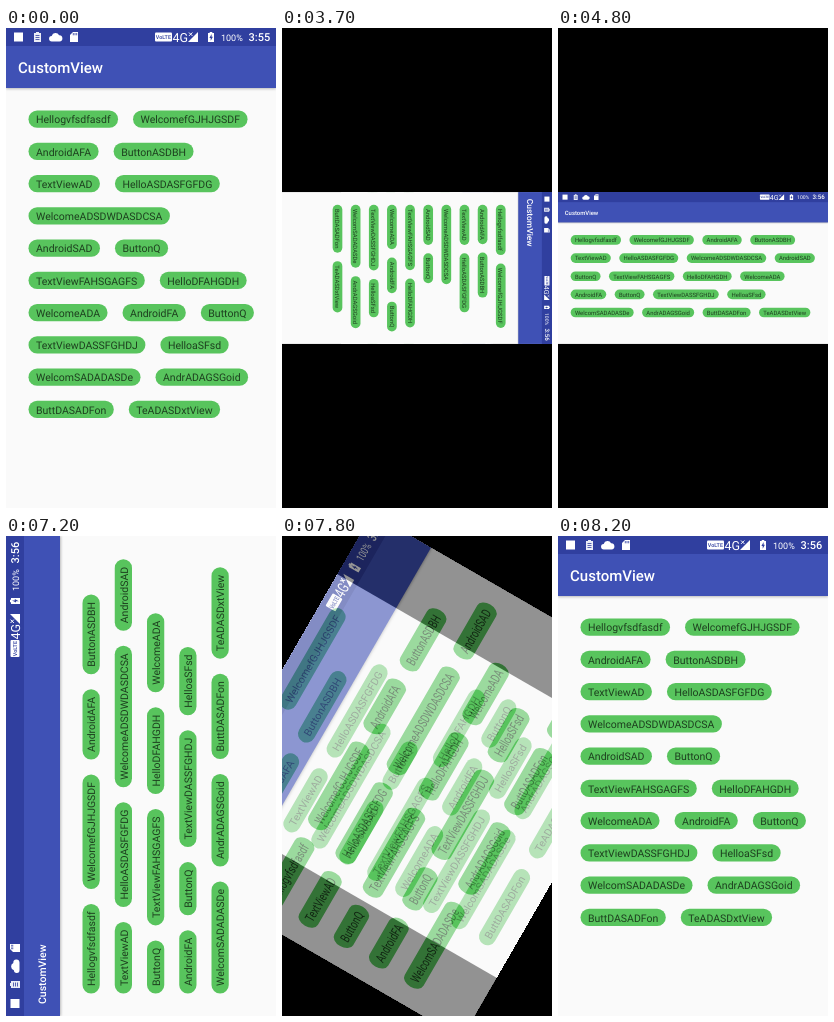
These frames come from a looping animation (270 px wide and 480 px high, 8.3 s). An HTML page:

```html
<!DOCTYPE html>
<html lang="en">
<head>
<meta charset="utf-8">
<title>CustomView</title>
<style>
html, body { margin: 0; width: 100%; height: 100%; overflow: hidden; background: #000; }
#stage { position: relative; width: 270px; height: 480px; overflow: hidden; background: #000; }
#view { position: absolute; left: 135px; top: 240px; overflow: hidden; background: #000; }
.screen, #frame { position: absolute; left: 50%; top: 50%; }
.screen { overflow: hidden; background: #fafafa; }
.screen svg { position: absolute; left: 0; top: 0; fill: #fff;
  font-family: Roboto, "Noto Sans", sans-serif; text-rendering: geometricPrecision; }
.bar { border-top: 18px solid #303f9f; background: #3f51b5; box-shadow: 0 .75px 2.5px rgba(0, 0, 0, .26); }
.medium { font-weight: 500; }
.chip rect { fill: #58c45d; }
.chip text { fill: rgba(0, 0, 0, .68); font-size: 10.5px; }
#frame { box-shadow: 0 0 0 600px #000; }
</style>
</head>
<body>
<div id="stage"><div id="view"></div></div>
<script>
const labels = ('Hellogvfsdfasdf WelcomefGJHJGSDF AndroidAFA ButtonASDBH TextViewAD HelloASDASFGFDG ' +
  'WelcomeADSDWDASDCSA AndroidSAD ButtonQ TextViewFAHSGAGFS HelloDFAHGDH WelcomeADA AndroidFA ' +
  'ButtonQ TextViewDASSFGHDJ HelloaSFsd WelcomSADADASDe AndrADAGSGoid ButtDASADFon TeADASDxtView').split(' ');

const statusIcons = width => `
  <rect x="8" y="4.5" width="9" height="9"/>
  <path d="M28 5h2v-1h3v1h2v9h-7z" opacity=".9"/>
  <path d="M29.5 7.5h4M29.5 9.5h4M29.5 11.5h4" stroke="#303f9f" stroke-width=".8"/>
  <path d="M46 13.5a2.8 2.8 0 0 1-.3-5.6a4 4 0 0 1 7.4-.6a3.1 3.1 0 0 1 .4 6.2z"/>
  <path d="M67 4h5v10h-8v-7z"/>
  <path d="M67.3 5v2.3M69 5v2.3M70.7 5v2.3" stroke="#303f9f" stroke-width=".8"/>
  <g transform="translate(${width - 270})">
    <rect x="149" y="4.5" width="17" height="9" rx="1"/>
    <text class="medium" x="149.8" y="11.2" font-size="5.4" fill="#303f9f">VoLTE</text>
    <text x="166.5" y="13.8" font-size="12.5">4G</text>
    <path d="M182 14L192 4V14z"/>
    <path d="M183 4.5l3.4 3.4m0-3.4l-3.4 3.4" stroke="#fff"/>
    <path d="M202 5h1.7v-1h2.6v1h1.7v9h-6z"/>
    <path d="M205.6 6l-2.2 4h1.3v2.8l2.2-4h-1.3z" fill="#303f9f"/>
    <text x="215" y="12.6" font-size="9">100%</text>
    <text class="clock medium" x="242.5" y="13" font-size="11">3:55</text>
  </g>`;

const view = document.getElementById('view');
const EDGE = 22.5, GAP = 15, PAD = 7.5, CHIP = 17.25, ROW = CHIP + GAP;

// lay the chips out row by row, each as wide as its text
function flow(svg, top, counts) {
  const chips = svg.querySelectorAll('.chip');
  let next = 0;
  counts.forEach((n, row) => {
    let x = EDGE;
    for (const end = next + n; next < end; next++) {
      const [pill, text] = chips[next].children;
      const width = text.getComputedTextLength() + 2 * PAD;
      pill.setAttribute('width', width);
      chips[next].setAttribute('transform', `translate(${x} ${top + row * ROW})`);
      x += width + GAP;
    }
  });
}

function addScreen(w, h, bar, titleSize, counts) {
  const el = document.createElement('div');
  el.className = 'screen';
  el.style.width = w + 'px';
  el.style.height = h + 'px';
  const chips = labels.map(s => `<g class="chip"><rect height="${CHIP}" rx="${CHIP / 2}"/>
    <text x="${PAD}" y="12.75">${s}</text></g>`);
  el.innerHTML = `<div class="bar" style="height:${bar}px"></div>
    <svg width="${w}" height="${h}">${statusIcons(w)}
      <text class="medium" x="12" y="${18 + bar / 2 + .39 * titleSize}" font-size="${titleSize}">CustomView</text>
      ${chips.join('')}</svg>`;
  view.append(el);
  flow(el.querySelector('svg'), 18 + bar + EDGE, counts);
  return { el, w, h };
}

const portrait = addScreen(270, 480, 42, 15, [2, 2, 2, 1, 2, 2, 3, 2, 2, 2]);
const landscape = addScreen(480, 270, 36, 10.5, [4, 4, 4, 4, 4]);
const frame = document.createElement('div');
frame.id = 'frame';
view.append(frame);
const clocks = document.querySelectorAll('.clock');

const LOOP = 8300, STEP = 100;
const TURN = 400, HOLD = 485;
const TO_LANDSCAPE = 3700, TO_PORTRAIT = 7200;

// cubic-bezier(.4, 0, .2, 1)
function ease(x) {
  if (x <= 0) return 0;
  if (x >= 1) return 1;
  let lo = 0, hi = 1;
  for (let i = 0; i < 24; i++) {
    const s = (lo + hi) / 2, r = 1 - s;
    if (1.2 * r * r * s + .6 * r * s * s + s * s * s < x) lo = s; else hi = s;
  }
  return lo * lo * (3 - 2 * lo);
}

function place(el, angle, sx = 1, sy = 1) {
  el.style.transform = `translate(-50%, -50%) rotate(${angle}deg) scale(${sx}, ${sy})`;
}

function show(screen, previous, startAngle, p) {
  const angle = startAngle * (1 - p);
  const sx = 1 + (screen.w / previous.w - 1) * p;
  const sy = 1 + (screen.h / previous.h - 1) * p;
  const zoom = 270 / screen.w;

  view.style.width = screen.w + 'px';
  view.style.height = screen.h + 'px';
  view.style.transform = `translate(-50%, -50%) scale(${zoom})`;

  place(screen.el, angle);
  screen.el.style.opacity = 1;
  screen.el.style.zIndex = 1;

  // the outgoing screen stretches toward the new shape while it fades
  place(previous.el, angle, sx, sy);
  previous.el.style.opacity = Math.max(0, 1 - 1.25 * p);
  previous.el.style.zIndex = 2;

  frame.style.width = previous.w + 'px';
  frame.style.height = previous.h + 'px';
  frame.style.zIndex = 3;
  frame.style.display = p < 1 ? 'block' : 'none';
  place(frame, angle, sx, sy);
}

function draw(t) {
  const progress = start => ease((t - start - HOLD) / TURN);
  if (t < TO_LANDSCAPE) show(portrait, landscape, 0, 1);
  else if (t < TO_PORTRAIT) show(landscape, portrait, 90, progress(TO_LANDSCAPE));
  else show(portrait, landscape, -90, progress(TO_PORTRAIT));
  const time = t < 1500 ? '3:55' : '3:56';
  clocks.forEach(c => { c.textContent = time; });
}

const origin = performance.now();
let last = -1;
function tick() {
  const elapsed = Math.max(0, performance.now() - origin) % LOOP;
  const t = Math.floor(elapsed / STEP) * STEP;
  if (t !== last) draw(last = t);
  requestAnimationFrame(tick);
}
tick();
</script>
</body>
</html>
```
